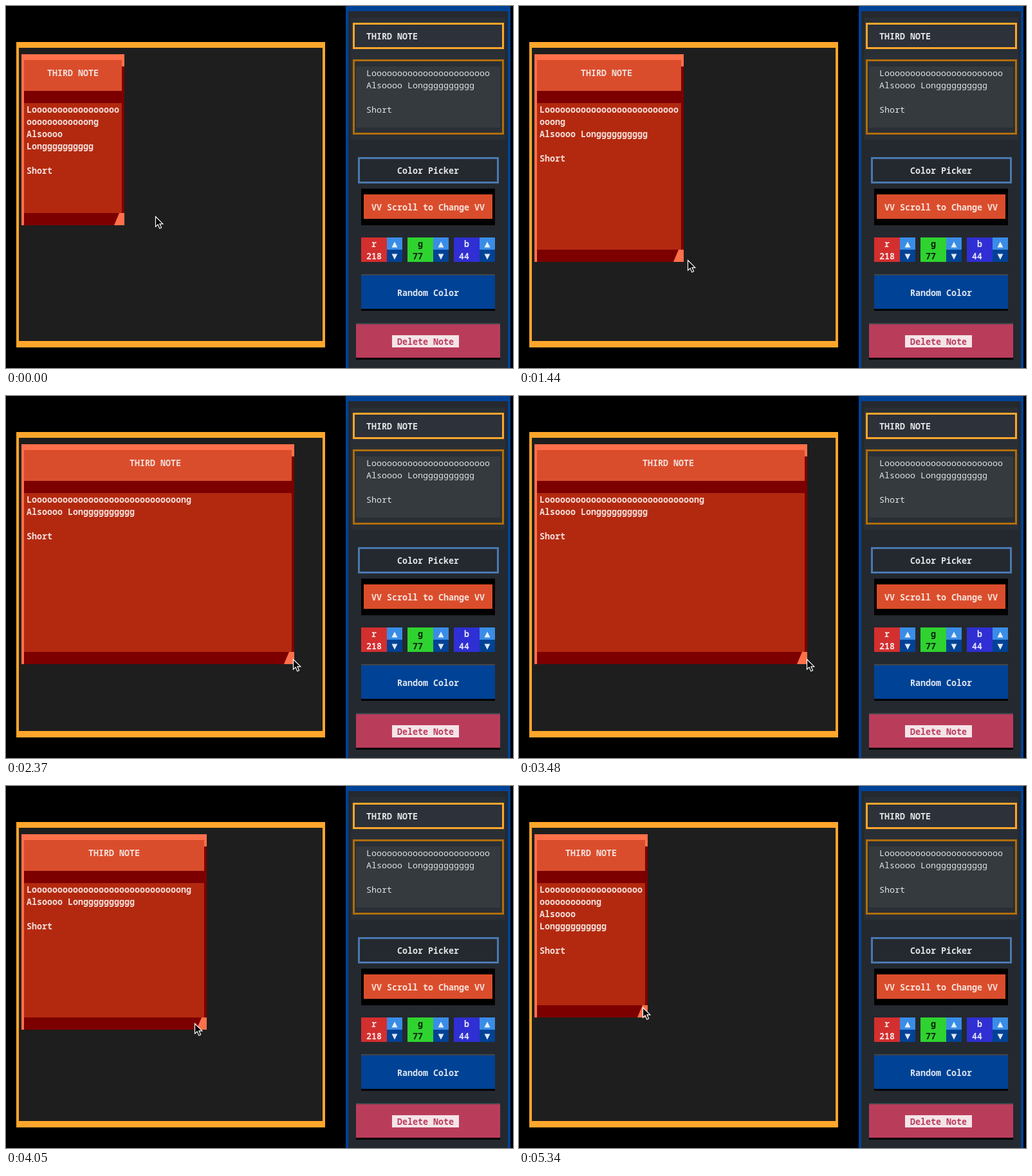
These frames come from a looping animation (788 by 563 pixels, 5.37 s). An HTML page:

```html
<!DOCTYPE html>
<html lang="en">
<head>
<meta charset="utf-8">
<title>Sticky notes</title>
<style>
html, body { margin: 0; width: 100%; height: 100%; overflow: hidden; background: #000; }
svg { display: block; width: 788px; height: 563px; }
rect { shape-rendering: crispEdges; }
text { font: 700 13.3333px "Noto Sans Mono", "DejaVu Sans Mono", monospace; fill: #e1e3e5; white-space: pre; }
.thin { font-weight: 400; }
#note text { fill: #f3dfda; }
</style>
</head>
<body>
<svg viewBox="0 0 788 563">
  <g id="board"></g>
  <g id="note"></g>
  <g id="panel"></g>
  <path id="cursor" d="M.5 .5V16.2L4.1 12.8L6.8 19L9.6 17.8L6.9 11.8H11.8Z" fill="#000" stroke="#fff" stroke-width="1.2"/>
</svg>
<script>
const LOOP = 5370, STEP = 30, LAG = 38, GRAB = 960;
const CELL_W = 8, CELL_H = 19, LEFT = 24;
const BLUE = '#004295', AMBER = '#ffa62b', PANEL = '#24292f';
const TITLE = 'THIRD NOTE';
const BODY = ['L' + 'o'.repeat(29) + 'ng', 'Alsoooo Lon' + 'g'.repeat(10), '', 'Short'];

// pointer path: time, x, y
const PATH = [
  [0, 232, 327], [360, 179, 331], [GRAB, 179, 331], [1170, 193, 349],
  [1500, 282, 401], [1710, 366, 408], [2040, 428, 411], [2370, 446, 409],
  [3450, 446, 409], [3480, 447, 409], [3510, 447, 409], [3540, 446, 409],
  [3660, 446, 409], [4050, 293, 369], [4230, 236, 361], [4470, 200, 350],
  [4710, 200, 350], [4980, 193, 344], [5310, 193, 344], [5340, 192, 344]
];

const byId = id => document.getElementById(id);
const rowTop = row => row * CELL_H - 1;
// rectangle from its two corners
const box = (x1, y1, x2, y2, fill) =>
  `<rect x="${x1}" y="${y1}" width="${x2 - x1}" height="${y2 - y1}" fill="${fill}"/>`;
const poly = (points, fill) => `<polygon points="${points}" fill="${fill}"/>`;
const frame = (x1, y1, x2, y2, line, fill) =>
  box(x1, y1, x2, y2, line) + box(x1 + 3, y1 + 3, x2 - 3, y2 - 3, fill);
const label = (x, row, str, fill = '', cls = '') =>
  `<text x="${x}" y="${rowTop(row) + 15}" class="${cls}"${fill && ` style="fill:${fill}"`}>${str}</text>`;

function spinner(x, name, value, fill, ink) {
  const cx = x + 52;
  return box(x, 360, x + 40, 398, fill) +
    label(x + 16, 19, name, ink) + label(x + 8, 20, value, ink) +
    box(x + 40, 360, x + 64, 379, '#398de7') + box(x + 40, 379, x + 64, 398, BLUE) +
    poly(`${cx - 4.5},375.5 ${cx},366.5 ${cx + 4.5},375.5`, '#e7f1fc') +
    poly(`${cx - 4.5},385.5 ${cx},394.5 ${cx + 4.5},385.5`, '#e0e8f2');
}

const button = (x1, y, x2, fill) =>
  box(x1, y, x2, y + 57, '#000') + box(x1, y, x2, y + 2, '#41464d') +
  box(x1, y + 2, x2, y + 54, fill);

function drawPanel() {
  const lines = ['L' + 'o'.repeat(23), ...BODY.slice(1)];
  byId('board').innerHTML = box(16, 56, 496, 531, AMBER) + box(20, 65, 492, 521, '#1e1e1e');
  byId('panel').innerHTML =
    box(528, 0, 784, 563, BLUE) + box(532, 8, 780, 563, PANEL) +
    box(536, 18, 776, 208, '#2a2f36') +
    frame(539, 26, 774, 67, AMBER, '#2c313a') + label(560, 2, TITLE) +
    frame(539, 83, 774, 200, '#b06e0a', '#2a2f36') + box(544, 94, 768, 189, '#343a3d') +
    lines.map((s, i) => label(560, 5 + i, s, '', 'thin')).join('') +
    frame(547, 235, 766, 276, '#4a78b0', PANEL) + label(608, 13, 'Color Picker') +
    box(552, 284, 760, 341, '#000') + box(556, 293, 756, 331, '#da4d2c') +
    label(568, 16, 'VV Scroll to Change VV', '#f8e2dc') +
    spinner(552, 'r', '218', '#d32f2f', '#f9e3e3') +
    spinner(624, 'g', '77', '#2fd32f', '#082008') +
    spinner(696, 'b', '44', '#2f2fd3', '#e3e3f9') +
    button(552, 417, 760, BLUE) + label(608, 23, 'Random Color', '#dde5f0') +
    button(544, 493, 768, '#ba3c5b') + box(600, 512, 704, 531, '#f4e4e8') +
    label(608, 27, 'Delete Note', '#ba3c5b');
}

// tangent that keeps the path free of overshoot
function slope(i, k) {
  if (i === 0 || i === PATH.length - 1) return 0;
  const [a, b, c] = [PATH[i - 1], PATH[i], PATH[i + 1]];
  const before = (b[k] - a[k]) / (b[0] - a[0]);
  const after = (c[k] - b[k]) / (c[0] - b[0]);
  return before * after > 0 ? 2 * before * after / (before + after) : 0;
}

function pointer(t) {
  let i = PATH.findIndex(p => p[0] > t) - 1;
  if (i < 0) i = PATH.length - 2;
  const a = PATH[i], b = PATH[i + 1], span = b[0] - a[0];
  const u = Math.min(1, (t - a[0]) / span), v = 1 - u;
  return [1, 2].map(k =>
    a[k] * (1 + 2 * u) * v * v + b[k] * u * u * (3 - 2 * u) +
    span * u * v * (slope(i, k) * v - slope(i + 1, k) * u));
}

function wrap(str, width) {
  const out = [];
  let line = '';
  for (let word of str.split(' ')) {
    if (line && line.length + 1 + word.length > width) {
      out.push(line);
      line = '';
    }
    while (word.length > width) {
      out.push(word.slice(0, width));
      word = word.slice(width);
    }
    line = line ? line + ' ' + word : word;
  }
  return [...out, line];
}

function drawNote(right, bottom) {
  const cols = (right - LEFT) / CELL_W;
  const titleX = LEFT + Math.floor((cols - TITLE.length) / 2) * CELL_W;
  const foot = bottom - CELL_H;
  const rows = BODY.flatMap(s => wrap(s, cols - 2));
  return box(LEFT, 75, right, bottom, '#ff704a') +
    box(28, 94, right, bottom, '#7c0000') +
    box(28, 84, right - 4, 132, '#da4d2c') +
    box(28, 151, right - 4, foot, '#b3290f') +
    poly(`${right - 8},${foot} ${right},${foot} ${right},${bottom} ${right - 16},${bottom}`, '#ff704a') +
    label(titleX, 5, TITLE) +
    rows.map((s, i) => label(32, 8 + i, s)).join('');
}

let shown = '';
function render(now) {
  const t = Math.floor(now % LOOP / STEP) * STEP;
  const [x, y] = pointer(t).map(Math.round);
  byId('cursor').setAttribute('transform', `translate(${x} ${y})`);

  // the dragged corner trails the pointer and snaps to whole cells
  const [dx, dy] = pointer(Math.max(t - LAG, GRAB));
  const right = (Math.floor(dx / CELL_W) + 1) * CELL_W;
  const bottom = rowTop(Math.floor((dy + 1) / CELL_H) + 1);
  const size = right + ',' + bottom;
  if (size !== shown) {
    byId('note').innerHTML = drawNote(right, bottom);
    shown = size;
  }
}

drawPanel();
const start = performance.now();
function tick() {
  render(performance.now() - start);
  requestAnimationFrame(tick);
}
tick();
</script>
</body>
</html>
```
